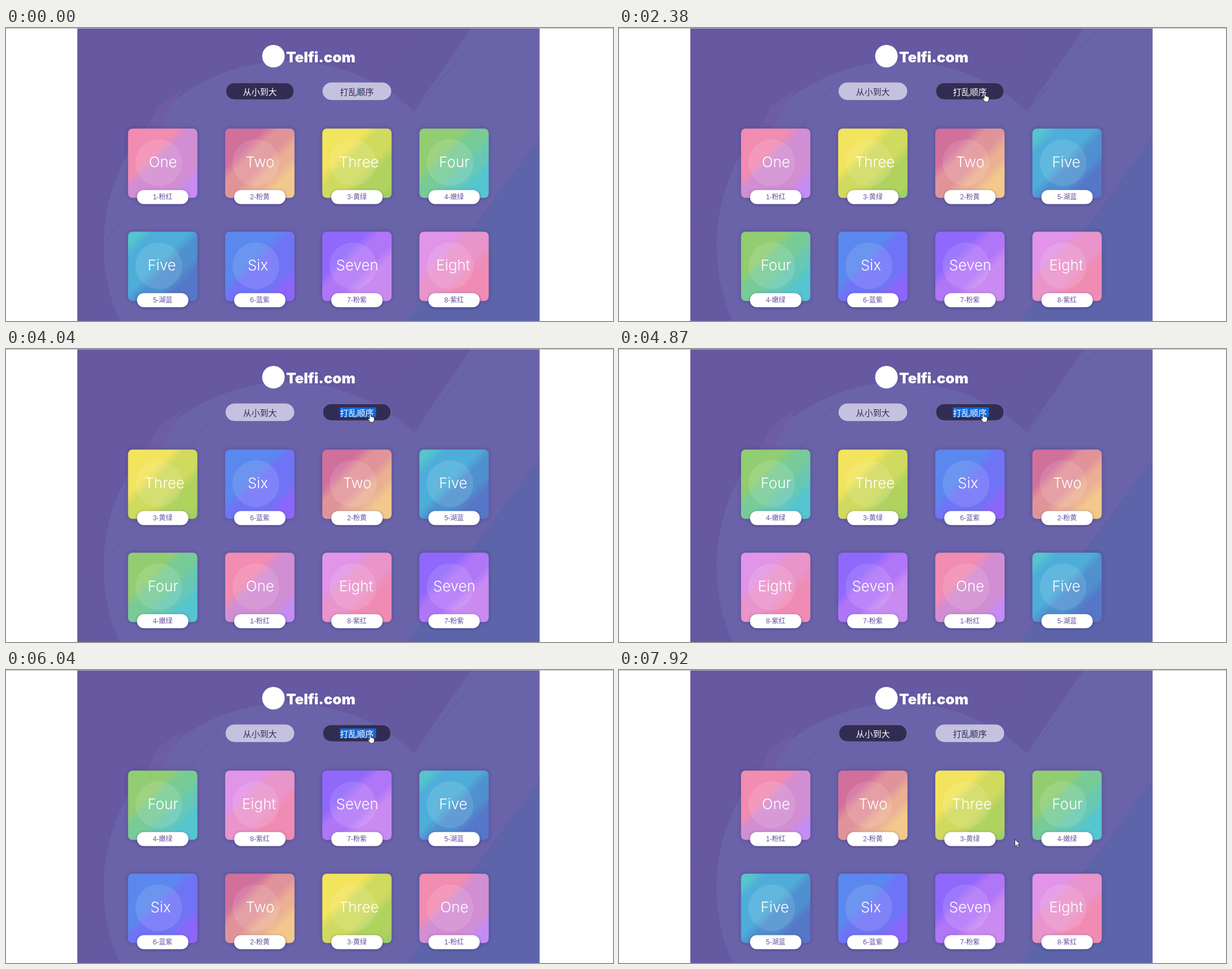
Write an HTML page that moves like this. It is 1077 px wide and 520 px high and loops after 8000 ms.

```html
<!DOCTYPE html>
<html lang="zh-CN">
<head>
<meta charset="utf-8">
<style>
html, body { margin: 0; width: 100%; height: 100%; overflow: hidden; background: #fff; }
#stage { position: relative; width: 1077px; height: 520px; overflow: hidden; }
#stage > *, .card > * { position: absolute; }
#stage svg { overflow: visible; }
.logo { left: 497px; top: 32px; font: 900 26px/40px Inter, sans-serif; color: #fff; letter-spacing: -.2px; }
.btn {
  top: 97px; width: 122px; height: 31px; border-radius: 16px; box-sizing: border-box;
  border: 1px solid #cfcbe4; background: #c6c1de; color: #332c52; transform: translate(-.5px, -.3px);
  font: 15px/29px "Noto Sans CJK SC", "Noto Sans CJK", sans-serif; text-align: center;
}
.btn span { display: inline-block; height: 17px; line-height: 17px; }
.btn.on { background: #332c52; border-color: #766f9f; color: #fff; }
.btn.picked span { background: #1469d8; padding-right: 4px; margin-right: -4px; }
.btn.sliver span { background: linear-gradient(#8fb2dc, #8fb2dc) 32px 2px / 5px 14px no-repeat; }
.card { left: 0; top: 0; width: 123px; height: 123px; border-radius: 8px; box-shadow: 0 0 6px rgba(45, 36, 105, .42); }
.disc { left: 13px; top: 19px; width: 83px; height: 83px; border-radius: 50%; background: rgba(255, 255, 255, .11); }
.name { top: 39px; width: 124px; text-align: center; font: 300 26px/40px Inter, sans-serif; color: #fff; }
.tag {
  left: 16px; top: 109px; width: 91px; height: 25px; border-radius: 12px; background: #fff;
  box-shadow: 0 1px 4px rgba(45, 36, 105, .6); text-align: center; color: #6650a0;
  font: 12px/24px "Liberation Sans", "Noto Sans CJK SC", "Noto Sans CJK", sans-serif;
}
</style>
</head>
<body>
<div id="stage">
  <svg width="1077" height="520">
    <defs>
      <linearGradient id="base" x2="1" y2="1">
        <stop offset=".3" stop-color="#6658a1"/><stop offset=".7" stop-color="#645aa3"/>
        <stop offset="1" stop-color="#5e63aa"/>
      </linearGradient>
      <clipPath id="page"><path d="M126.5 1H946.5V520H126.5Z"/></clipPath>
    </defs>
    <g clip-path="url(#page)">
      <path d="M126 0H947V520H126Z" fill="url(#base)"/>
      <circle cx="500" cy="386" r="327" fill="#6a63a9"/>
      <path d="M825 0H947V195L730 490L600 327Z" fill="#6963a9"/>
      <path d="M947 195L712 520H947Z" fill="#5d64aa"/>
      <path d="M313 108L270 138L236 205L262 195Z" fill="#6e5ca4"/>
      <path d="M383 96L176 380M850 0L722 150" stroke="#6058a0" fill="none"/>
    </g>
    <path d="M0 .5H1077" stroke="#b5b5b9"/>
    <circle cx="474.5" cy="50" r="20" fill="#fff"/>
  </svg>
  <div class="logo">Telfi.com</div>
  <div class="btn" id="sort" style="left:390px"><span>从小到大</span></div>
  <div class="btn" id="mix" style="left:562px"><span>打乱顺序</span></div>
  <svg id="cursor" width="16" height="22">
    <path id="arrow" d="M.5 .5V13L3.4 10.4L5.4 15L7.6 14L5.6 9.6H9.4Z" fill="#fff" stroke="#333"/>
    <path id="hand" d="M3 1.5Q4.5 0 5.5 1.5V6Q7 5.3 7.6 6.6Q9 6 9.7 7.2Q11.4 7 11.5 8.6V12L9.8 16H4.2L.6 10.8Q.2 9 2 9.2L3 10Z" fill="#fff" stroke="#333"/>
  </svg>
</div>
<script>
const LOOP = 8000;
const $ = id => document.getElementById(id);

// name, tag, horizontal nudge, then colour and band end (%) pairs
const kinds = [
  ["One", "粉红", 0, "#f28cb0 40 #d28ed2 81 #c48cf4 100"],
  ["Two", "粉黄", 0, "#d2709c 33 #e0949a 57 #ebb094 74 #f2c88c 100"],
  ["Three", "黄绿", 3, "#f2e45c 37 #d0da5e 65 #b0d360 93 #96cf6c 100"],
  ["Four", "嫩绿", 0, "#92cd72 37 #78cb97 58 #68c8b4 74 #55c5d0 100"],
  ["Five", "湖蓝", -2, "#55c6cc 14 #4eaed9 49 #4f90cf 72 #5676c8 100"],
  ["Six", "蓝紫", -4, "#5a88ee 43 #6f74f6 77 #8c66fa 100"],
  ["Seven", "粉紫", 0, "#9068fb 37 #b076f8 63 #c98af2 100"],
  ["Eight", "紫红", -2, "#e294e8 34 #e994cb 63 #f08cb4 100"],
];

// diagonal bands with soft borders
function bands(spec) {
  const part = spec.split(" "), stops = [], soft = 5;
  for (let i = 0, from = 0; i < part.length; i += 2) {
    const end = +part[i + 1];
    stops.push(`${part[i]} ${from}% ${end - soft}%`);
    from = end + soft;
  }
  return `linear-gradient(135deg, ${stops})`;
}

const cards = kinds.map(([name, tag, nudge, spec], i) => {
  const card = document.createElement("div");
  card.className = "card";
  card.style.background = bands(spec);
  card.innerHTML = `<div class="disc"></div><div class="name" style="left:${nudge}px">${name}</div>
    <div class="tag">${i + 1}-${tag}</div>`;
  $("stage").insertBefore(card, $("cursor"));
  return card;
});

// start time and card numbers by slot
const orders = [
  [0, "12345678"], [2380, "13254678"], [2810, "41357268"], [3210, "45372168"],
  [3640, "54638172"], [4040, "36254187"], [4440, "63421875"], [4870, "43628715"],
  [5300, "28546731"], [5610, "28547631"], [6040, "48756231"], [6850, "12345678"],
];

// start, end, number of steps, path points
const moves = [
  [270, 1270, 8, [[658, 147], [434, 134]]],
  [1420, 2080, 6, [[434, 134], [686, 118], [645, 115]]],
  [2380, 2810, 4, [[645, 115], [642, 114]]],
  [6040, 6850, 7, [[642, 114], [445, 115]]],
  [7380, 7920, 5, [[445, 115], [286, 180], [702, 300]]],
];

function along(points, p) {
  const s = p * (points.length - 1), i = Math.min(Math.floor(s), points.length - 2);
  return points[i].map((v, k) => v + (points[i + 1][k] - v) * (s - i));
}

function cursorAt(t) {
  const move = moves.findLast(m => t >= m[0]);
  if (!move) return null;
  const [start, end, steps, points] = move;
  const p = Math.min(1, (t - start) / (end - start));
  return along(points, Math.floor(p * (steps - 1) + 1e-6) / (steps - 1));
}

function draw(t) {
  const order = orders.findLast(o => t >= o[0])[1];
  [...order].forEach((n, slot) => {
    const x = 216.5 + slot % 4 * 172.33, y = slot < 4 ? 178.5 : 361.5;
    cards[n - 1].style.transform = `translate(${x}px, ${y}px)`;
  });

  const mixed = t >= 2380 && t < 6850;
  $("sort").classList.toggle("on", !mixed);
  $("mix").classList.toggle("on", mixed);
  $("mix").classList.toggle("picked", mixed && t >= 3640);
  $("mix").classList.toggle("sliver", !mixed);

  const pos = cursorAt(t), cursor = $("cursor").style;
  cursor.display = pos ? "" : "none";
  if (!pos) return;
  const [x, y] = pos.map(Math.round);
  cursor.left = x + "px";
  cursor.top = y + "px";
  const over = y < 127 && (x > 386 && x < 508 || x > 558 && x < 680);
  $("hand").style.display = over ? "" : "none";
  $("arrow").style.display = over ? "none" : "";
}

const begin = performance.now();
function tick() {
  draw((performance.now() - begin) % LOOP);
  requestAnimationFrame(tick);
}
tick();
</script>
</body>
</html>
```
